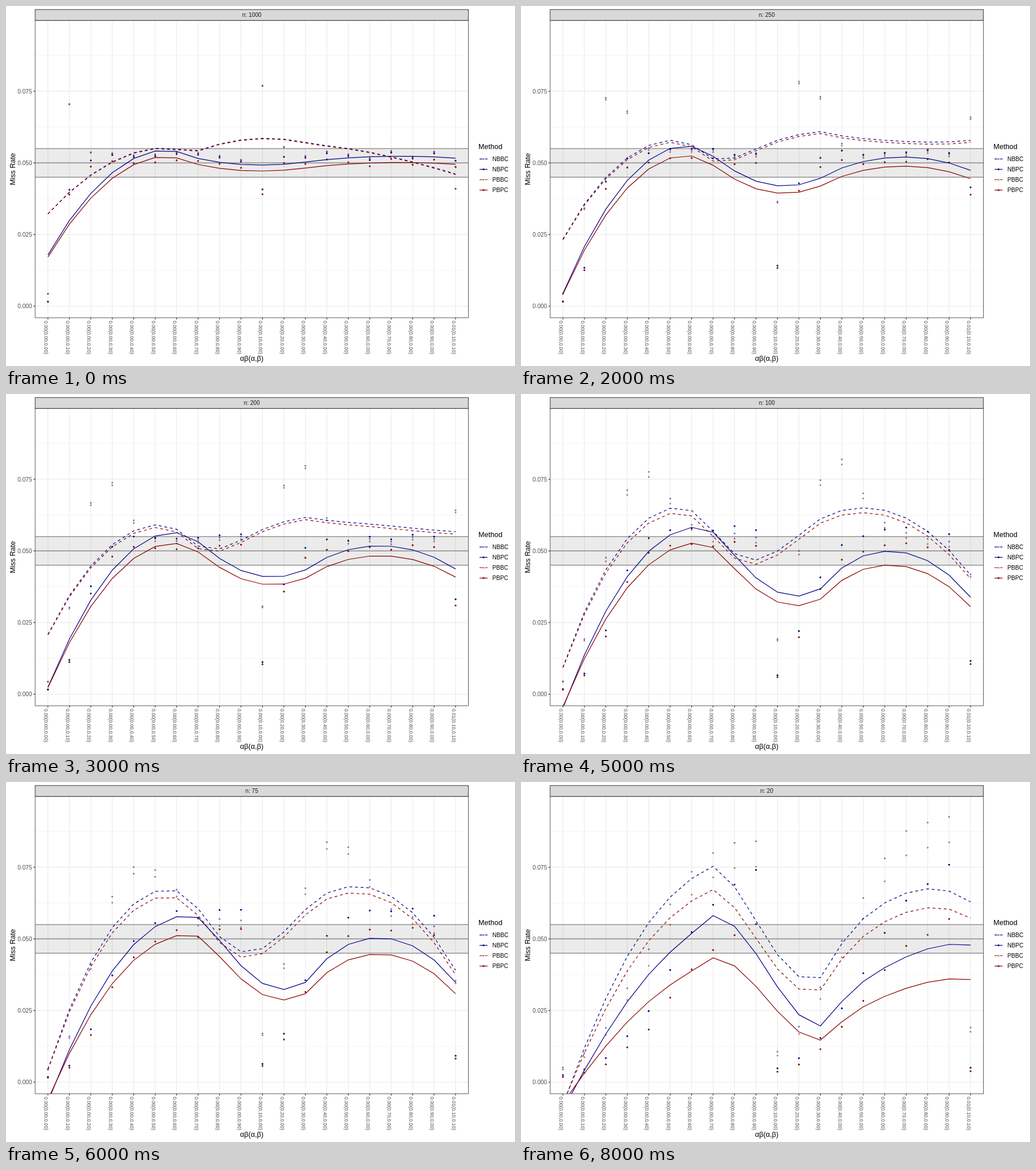
Recreate the animation shown at these times as an HTML page with a canvas. Size 890x629 px, loop 9000 ms.

```html
<!DOCTYPE html>
<html lang="en">
<head>
<meta charset="utf-8">
<title>Miss rate by sample size</title>
<style>
html, body { margin: 0; width: 100%; height: 100%; overflow: hidden; background: #fff; }
canvas { display: block; width: 890px; height: 629px; }
</style>
</head>
<body>
<canvas id="plot" width="890" height="629"></canvas>
<script>
const ctx = document.getElementById('plot').getContext('2d');
const FONT = '"Liberation Sans", Arial, sans-serif';
const BLUE = '#00008b', RED = '#8b0000';
const PANEL = { left: 51, top: 25.2, right: 808.4, bottom: 544.8 };
const SIZES = [1000, 500, 250, 200, 150, 100, 75, 50, 20];
const STEP_MS = 1000, COUNT = 20, LAST = COUNT - 1, SPAN = 15;

// The plateau of each method is level + excess / n, in misses per 5000 runs.
const METHODS = [
  { name: 'NBBC', color: BLUE, corrected: true, level: 262, excess: 1100 },
  { name: 'NBPC', color: BLUE, corrected: false, level: 257, excess: 2900 },
  { name: 'PBBC', color: RED, corrected: true, level: 262, excess: 200 },
  { name: 'PBPC', color: RED, corrected: false, level: 248, excess: 1050 }
];

const logistic = x => 1 / (1 + Math.exp(-x));

function random(seed) {
  const x = Math.sin(seed * 12.9898) * 43758.5453;
  return x - Math.floor(x);
}

// Size of the path that is not zero: 0 to 0.9, 0.1 to 0.9, then 0.1 for both.
const effect = i => i < 10 ? i / 10 : i < LAST ? (i - 9) / 10 : 0.1;

// Misses rise with the signal; bias correction overshoots before settling.
function misses(n, i, { corrected, level, excess }) {
  const raw = effect(i) * Math.sqrt(n);
  const z = i === LAST ? raw * (1 + 0.4 * raw * raw) : raw;
  const plateau = level + excess / n;
  const noise = 16 * (random(n + 7 * i) - 0.5) * Math.min(1, z / 3);
  if (!corrected) return plateau * logistic(1.5 * (z - 2.3)) + noise;
  const bump = i === LAST
    ? 85 * Math.sin(1.2 * raw)
    : (i < 10 ? 115 : 150) * Math.exp(-(((z - 3.7) / 1.7) ** 2));
  return plateau * logistic(1.7 * (z - 1.45)) + bump + noise;
}

// Local quadratic fit at x0 with tricube weights on the nearest points.
function loess(values, x0) {
  const h = values.map((_, i) => Math.abs(i - x0)).sort((a, b) => a - b)[SPAN - 1];
  const s = [0, 0, 0, 0, 0], b = [0, 0, 0];
  values.forEach((v, i) => {
    const d = (i - x0) / h;
    if (Math.abs(d) >= 1) return;
    const w = (1 - Math.abs(d) ** 3) ** 3;
    for (let p = 0; p < 5; p++) s[p] += w * d ** p;
    for (let p = 0; p < 3; p++) b[p] += w * v * d ** p;
  });
  // First row of the inverse normal matrix, by cofactors.
  const c0 = s[2] * s[4] - s[3] * s[3];
  const c1 = s[2] * s[3] - s[1] * s[4];
  const c2 = s[1] * s[3] - s[2] * s[2];
  return (c0 * b[0] + c1 * b[1] + c2 * b[2]) / (c0 * s[0] + c1 * s[1] + c2 * s[2]);
}

const scenes = SIZES.map(n => ({
  n,
  series: METHODS.map(method => {
    const dots = Array.from({ length: COUNT }, (_, i) => misses(n, i, method));
    return { method, dots, curve: dots.map((_, i) => loess(dots, i)) };
  })
}));

const px = i => 73.3 + 37.515 * i;
const py = count => 524.5 - count * 1.0015;

function path(points, color, width, dash = []) {
  ctx.beginPath();
  points.forEach(([x, y]) => ctx.lineTo(x, y));
  ctx.strokeStyle = color;
  ctx.lineWidth = width;
  ctx.setLineDash(dash);
  ctx.stroke();
  ctx.setLineDash([]);
}
const hline = (y, color, width) => path([[PANEL.left, y], [PANEL.right, y]], color, width);

function dot(x, y, { color, corrected }) {
  ctx.globalAlpha = corrected ? 0.5 : 1;
  ctx.fillStyle = color;
  ctx.beginPath();
  ctx.arc(x, y, 1.6, 0, 2 * Math.PI);
  ctx.fill();
  ctx.globalAlpha = 1;
}

function text(str, x, y, size, { align = 'left', color = '#000', turn = 0 } = {}) {
  ctx.save();
  ctx.translate(x, y);
  ctx.rotate(turn * Math.PI / 2);
  ctx.font = `${size}px ${FONT}`;
  ctx.textAlign = align;
  ctx.fillStyle = color;
  ctx.fillText(str, 0, 0);
  ctx.restore();
}

const methodLine = (points, { color, corrected }) =>
  path(points, color, 1.22, corrected ? [4.9, 4.9] : []);

function category(i) {
  const size = effect(i).toFixed(2);
  if (i === LAST) return `0.01(${size},${size})`;
  return i < 10 ? `0.00(0.00,${size})` : `0.00(${size},0.00)`;
}

function drawGrid() {
  for (let k = 0; k < 4; k++) {
    hline(py(62.5 + 125 * k), '#ebebeb', 0.6);
    hline(py(125 * k), '#ebebeb', 1.22);
  }
  for (let i = 0; i < COUNT; i++) {
    path([[px(i), PANEL.top], [px(i), PANEL.bottom]], '#ebebeb', 1.22);
  }
}

function drawBand() {
  ctx.fillStyle = 'rgba(0,0,0,0.08)';
  ctx.fillRect(PANEL.left, py(275), PANEL.right - PANEL.left, py(225) - py(275));
  for (const c of [225, 250, 275]) hline(py(c), '#7f7f7f', 1.1);
}

function drawFrame(n) {
  const width = PANEL.right - PANEL.left;
  ctx.strokeStyle = '#333';
  ctx.lineWidth = 0.8;
  ctx.strokeRect(PANEL.left, PANEL.top, width, PANEL.bottom - PANEL.top);
  ctx.lineWidth = 1;
  ctx.fillStyle = '#d9d9d9';
  ctx.fillRect(PANEL.left, 6.2, width, PANEL.top - 6.2);
  ctx.strokeRect(PANEL.left, 6.2, width, PANEL.top - 6.2);
  text(`n: ${n}`, 429.8, 19.2, 10.1, { align: 'center', color: '#1a1a1a' });
}

function drawAxes() {
  const grey = '#4d4d4d';
  for (let k = 0; k < 4; k++) {
    const y = py(125 * k);
    path([[PANEL.left - 3, y], [PANEL.left, y]], '#333', 1.22);
    text((0.025 * k).toFixed(3), 45.5, y + 3.6, 10.1, { align: 'right', color: grey });
  }
  for (let i = 0; i < COUNT; i++) {
    path([[px(i), PANEL.bottom], [px(i), PANEL.bottom + 3]], '#333', 1.22);
    text(category(i), px(i) - 6.2, 550, 8.6, { color: grey, turn: 1 });
  }
  text('αβ(α,β)', 429.8, 620, 12.6, { align: 'center' });
  text('Miss Rate', 15.5, 285, 12.6, { align: 'center', turn: -1 });
}

function drawLegend() {
  text('Method', 826, 250, 12.6);
  METHODS.forEach((method, k) => {
    const y = 267.3 + 18.1 * k;
    methodLine([[828, y], [842, y]], method);
    dot(835, y, method);
    text(method.name, 850.5, y + 3.6, 10.1);
  });
}

function draw({ n, series }) {
  ctx.fillStyle = '#fff';
  ctx.fillRect(0, 0, 890, 629);
  ctx.save();
  ctx.beginPath();
  ctx.rect(PANEL.left, PANEL.top, PANEL.right - PANEL.left, PANEL.bottom - PANEL.top);
  ctx.clip();
  drawGrid();
  drawBand();
  for (const { method, dots } of series) {
    dots.forEach((v, i) => dot(px(i), py(v), method));
  }
  for (const { method, curve } of series) {
    methodLine(curve.map((v, i) => [px(i), py(v)]), method);
  }
  ctx.restore();
  drawFrame(n);
  drawAxes();
  drawLegend();
}

const start = performance.now();
function tick() {
  const t = Math.max(0, performance.now() - start);
  draw(scenes[Math.floor(t / STEP_MS) % scenes.length]);
  requestAnimationFrame(tick);
}
tick();
</script>
</body>
</html>
```
